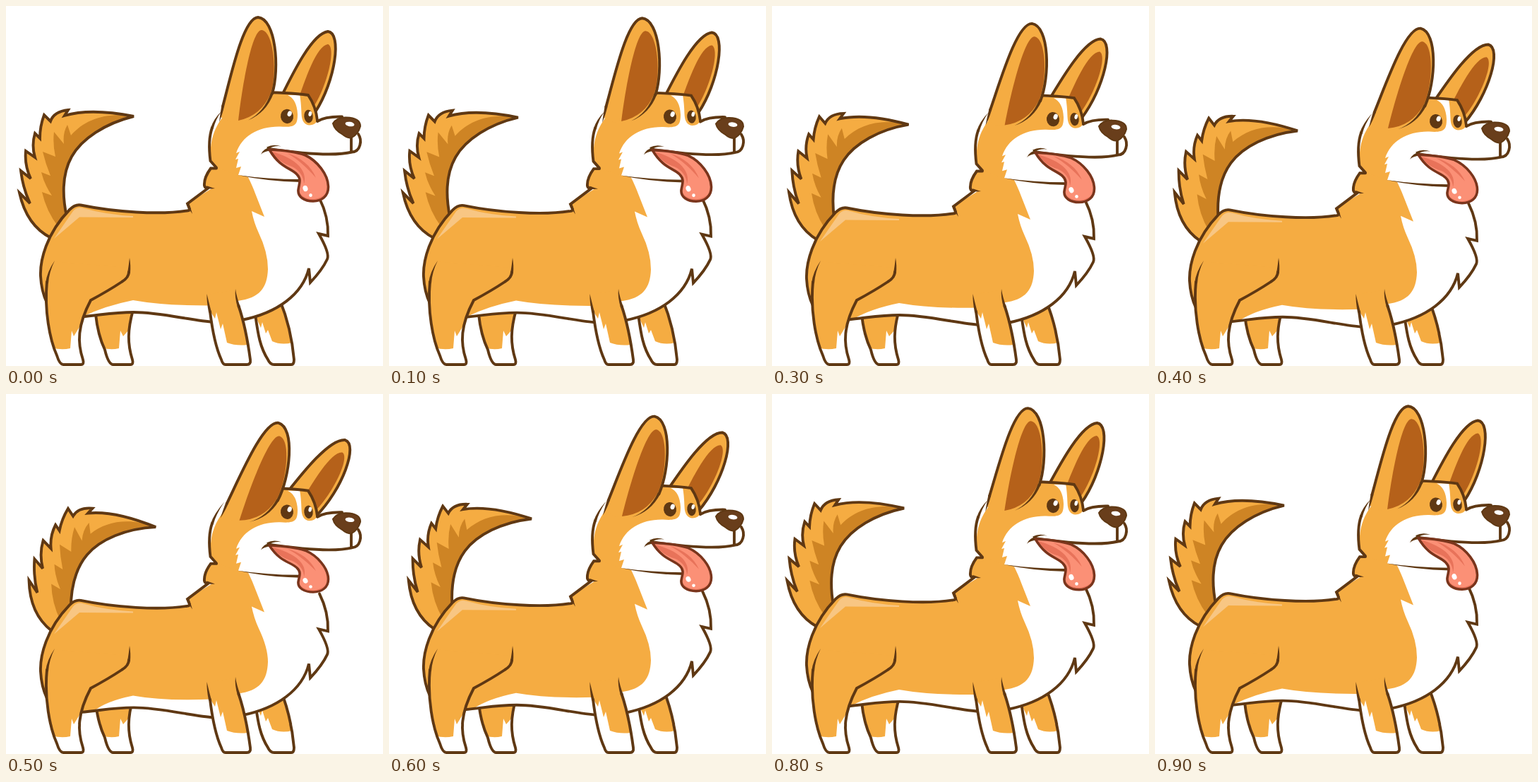
An HTML page for the animation above (1000 ms loop, 534 px wide and 509 px high).

```html
<!DOCTYPE html>
<html lang="en">
<head>
<meta charset="utf-8">
<title>Happy corgi</title>
<style>
html, body { margin: 0; width: 100%; height: 100%; overflow: hidden; background: #fff; }
svg { display: block; width: 100%; height: 100%; }
.line { fill: none; stroke: #5f3813; stroke-width: 3.9; stroke-linejoin: miter; stroke-linecap: round; }
.thin { stroke-width: 2; }
.coat { fill: #f5ac42; }
.white { fill: #fff; }
.dark { fill: #ce8424; }
.inner { fill: #b5611a; }
.shine { fill: #f8c683; }
.ink { fill: #5f3813; }
.nose { fill: #693e1b; }
.tongue { fill: #fb9076; }
.shade { fill: #e8735a; }
.lip { fill: none; stroke: #7a351c; stroke-width: 3.6; stroke-linejoin: round; }
</style>
</head>
<body>
<svg id="stage" viewBox="0 0 534 509" xmlns="http://www.w3.org/2000/svg"></svg>
<script>
const NS = 'http://www.w3.org/2000/svg';
const stage = document.getElementById('stage');

function add(parent, tag, attrs = {}) {
  const el = document.createElementNS(NS, tag);
  for (const key in attrs) el.setAttribute(key, attrs[key]);
  return parent.appendChild(el);
}
const group = () => add(stage, 'g');
const shape = (g, cls, d) => add(g, 'path', { class: cls, d });
const oval = (g, cls, cx, cy, rx, ry, turn = 0) =>
  add(g, 'ellipse', { class: cls, cx, cy, rx, ry, transform: `rotate(${turn} ${cx} ${cy})` });

// Brush stroke from a sharp tip to a full-width end
function taperPath(x0, y0, cx, cy, x1, y1, w = 3.9) {
  const len = Math.hypot(x1 - cx, y1 - cy);
  const nx = -(y1 - cy) / len * w / 2, ny = (x1 - cx) / len * w / 2;
  return `M${x0} ${y0}Q${cx + nx} ${cy + ny} ${x1 + nx} ${y1 + ny}` +
    `L${x1 - nx} ${y1 - ny}Q${cx - nx / 2} ${cy - ny / 2} ${x0} ${y0}Z`;
}
const taper = (g, ...pts) => shape(g, 'ink', taperPath(...pts));

// Leg: fill, white sock, outline
function leg(g, fill, sock, line) {
  shape(g, 'coat', fill);
  shape(g, 'white', sock);
  shape(g, 'line', line);
}

// Tail
const tail = group();
const under = 'C140 166 107 188 93 213C79 238 80 270 86 298';
const fur = 'M64 328C42 317 26 296 19 264L34 279Q24 258 21 233L35 244Q26 225 28 205' +
  'L41 214Q36 197 41 180L48 187Q48 170 54 154L63 163Q68 149 88 147L83 155Q120 144 181 156';
shape(tail, 'coat', fur + under + 'L90 330Z');
shape(tail, 'dark', 'M181 156C142 150 112 160 92 183L87 168Q80 180 82 195L68 178Q66 195 70 213' +
  'L52 206Q56 223 63 240L50 235Q54 252 65 268L51 263Q57 290 74 312L90 318L86 298' +
  'C80 270 79 238 93 213C107 188 140 166 181 156Z');
shape(tail, 'line', fur + under);

// Far ear
const farEar = group();
const farLeft = 'M386 136C402 104 432 39 456 36';
const farRight = 'C476 38 467 105 438 150';
shape(farEar, 'coat', farLeft + farRight + 'Z');
shape(farEar, 'inner', 'M410 144C424 102 440 56 456 54C468 59 455 112 436 142Z');
shape(farEar, 'line', farLeft + farRight);

// Far legs
const farLegs = group();
leg(farLegs,
  'M127 436Q131 470 142 490Q146 507 152 507H176Q181 507 179 500C172 478 172 458 180 430Z',
  'M136 483Q148 487 160 484L162 459L166 467L174 458Q172 480 180 502L177 507H150Q143 500 136 483Z',
  'M127 436Q130 465 140 486Q145 507 152 507H176Q181 507 179 500C172 478 172 458 180 430');
leg(farLegs,
  'M353 436C357 465 360 483 371 500Q374 507 380 507H404Q408 507 408 500Q404 455 388 416Z',
  'M354 440L361 455L363 447L368 463L371 458L377 474Q390 480 405 476L408 500L405 507H378Q361 486 354 440Z',
  'M353 436C357 465 360 483 371 500Q374 507 380 507H404Q408 507 408 500Q404 455 388 416');

// Trunk
const trunk = group();
const back = 'M259 289C218 296 152 291 106 281.5Q98 280 90 288C57 322 48 360 49 382Q50 403 58 420';
const belly = 'M106 439.5C135 437 150 433 181 433C220 433 262 445 295 447';
const chest = 'M334 444C384 434 420 408 429 371L431 391Q448 373 455 358Q459 350 443 322L456 325Q457 298 444 272';
shape(trunk, 'coat', back + 'L106 439.5' + belly.slice(10) + 'L334 444' + chest.slice(8) +
  'L330 238L300 228L290 229Q280 243 282 254Q283 258 293 257L257 279Z');
const bib = shape(trunk, 'white', '');
const bellyPatch = shape(trunk, 'white', '');
shape(trunk, 'shine', 'M68 329L95 290Q101 283 110 286Q142 295 180 297V299L104 298.5Z');
shape(trunk, 'line', back);
shape(trunk, 'line', belly);
shape(trunk, 'line', chest);
shape(trunk, 'line', 'M298 229.5L290 229.5Q280 243 281 254Q282 258 287 257L257 279.5L260 287');
taper(trunk, 296, 258, 290, 258, 284, 256);
taper(trunk, 264, 294, 260, 287, 257.5, 280);

// Near legs
const nearLegs = group();
const thigh = 'M58 390C54 430 62 472 72 494Q76 507 81 507H106Q111 507 109 500C101 476 101 452 120 416';
leg(nearLegs,
  'M68 361L58 390' + thigh.slice(7) + 'L165 388L174 370Z',
  'M65 483Q78 487 91 484L93 459L96 467L104 454Q102 482 110 502L107 507H79Q71 497 65 483Z',
  thigh + 'Q146 402 164 390Q174 384 174 376');
taper(nearLegs, 69, 360, 60, 376, 58, 392);
taper(nearLegs, 175, 356, 176, 366, 174, 378);
const shin = 'M289 432C293 465 299 487 305 500Q307 507 311 507H341Q347 507 346 500Q340 455 329.5 424';
leg(nearLegs,
  'M285 408L289 432' + shin.slice(8) + 'L325 401Z',
  'M289 431L296 442L298 433L304 457L307 449L313 476Q326 481 342 479L346 500L343 507H309Q294 474 289 431Z',
  shin);
taper(nearLegs, 284.5, 407, 286, 418, 289, 433);
taper(nearLegs, 325, 400, 325.5, 411, 330, 426);

// Head
const head = group();
const brow = 'M350 122Q400 122 428 126Q439 142 441 162';
const muzzle = 'M441 163Q452 156 476 156.5M499 181C505 190 502 206 490 206.5C472 211 435 211 372 202M489 184V205';
shape(head, 'coat', 'M320 140L350 122L428 126Q439 142 441 162L413 247L330 240L299 229L290 219' +
  'C288 192 294 172 311 152Z');
shape(head, 'white', 'M399 126Q412 132 413 153C413 169 409 172 388 170.5C357 170 334 184 326 208L331 206' +
  'L325 217L329 216L326 229L333 227L329 239Q370 246 415 247L420 212Q470 212 490 207' +
  'Q504 204 502 188L490 160Q460 152 441 163Q439 142 428 126Z');
shape(head, 'coat', 'M418 125L428 126Q439 142 441 162Q438 168 430 168.5Q419 168 418.5 152Q418 136 416 125Z');
shape(head, 'line', 'M298 228.5L289.5 219C287 200 287 186 292 172');
const nape = shape(head, 'ink', '');
shape(head, 'line', brow);
shape(head, 'line', muzzle);
taper(head, 328, 239, 370, 246, 417, 247);
taper(head, 361, 210, 364, 203, 375, 202, 5);
taper(head, 390, 198.5, 380, 196, 370, 201, 3.6);
oval(head, 'ink', 398, 156, 9, 10.2, -8);
oval(head, 'white', 401.7, 152.3, 3, 4, 20);
oval(head, 'ink', 428.5, 156, 6.2, 9.2, -6);
oval(head, 'white', 430.8, 152.4, 2.3, 3.6, 12);
const snub = 'M463 166Q469 157 482 157.5Q502 158 502 170Q499 181 490 186Q484 188 476 181Q465 175 463 166Z';
shape(head, 'nose', snub);
shape(head, 'line thin', snub);
oval(head, 'white', 487, 167, 6.5, 3.2, 8);

// Tongue
const tongue = group();
const lick = 'M373 203C395 204 410 206 424 211C441 219 456 238 456.5 255C457 269 447 276 435 276' +
  'C423 276 413 270 414 260C415 252 419 245 412 238C404 229 388 229 373 203Z';
shape(tongue, 'tongue', lick);
shape(tongue, 'shade', 'M376 206C390 209 407 217 415 226C424 236 424 245 422 252C422 240 414 231 405 227C392 223 384 216 376 206Z');
shape(tongue, 'shade', 'M398 208C418 214 432 226 439 243C427 229 414 217 398 208Z');
shape(tongue, 'shade', 'M415 262C420 274 440 278 453 265C446 280 419 279 415 262Z');
shape(tongue, 'lip', lick);
oval(tongue, 'white', 424, 258, 3.4, 4.3, -20);
oval(tongue, 'white', 431.5, 267.5, 2.3, 2.5);

// Near ear
const nearEar = group();
const earLine = 'M307 142C319 97 336 17 357 16C382 18 388 88 377 124';
shape(nearEar, 'coat', earLine + 'Q367 149 340 162L318 164L304 157Z');
shape(nearEar, 'inner', 'M329 162C333 125 347 34 362 34C380 36 384 98 375 123Q362 155 329 162Z');
shape(nearEar, 'line', earLine);
taper(nearEar, 302, 164, 304, 155, 307.3, 141);
taper(nearEar, 343, 161.5, 367, 150, 377, 123);

const move = (g, value) => g.setAttribute('transform', value);
const swing = (g, p, angle, x, y, dx, dy) =>
  move(g, `translate(${dx * p} ${dy * p}) rotate(${angle * p} ${x} ${y})`);

// p runs from 0 (standing tall) to 1 (crouched)
function pose(p) {
  const sink = 10.4 * p, hold = 0.35 * sink;
  swing(tail, p, 11, 68, 325, 1, 7.5);
  swing(farEar, p, 12, 439, 150, 1, 23);
  swing(nearEar, p, 11, 330, 162, 1.5, 17);
  move(trunk, `translate(0 ${sink})`);
  move(head, `translate(0 ${10.8 * p})`);
  move(tongue, `translate(0 ${30.6 * p}) scale(1 ${1 - 0.096 * p})`);
  nape.setAttribute('d', taperPath(305 + 4 * p, 149 - 7 * p, 296, 160, 291.8, 173));
  // The lower edges of the white patches stay closer to the legs
  bib.setAttribute('d', `M342 240Q349 254 353 265L366 298L348 290Q351 306 358 321` +
    `Q371 348 371 ${372 - hold}C370 ${398 - hold} 360 ${413 - hold} 328 ${417 - hold}` +
    `L330 444L334 444${chest.slice(8)}L413 244Z`);
  bellyPatch.setAttribute('d', `M${109 + 14 * p} 439Q140 424 180 416Q225 424 292 ${423.5 - 2.4 * p}` +
    `L330 ${424 - 3 * p}V444L295 447C262 445 220 433 181 433C150 433 135 437 ${109 + 14 * p} 439Z`);
}

function frame() {
  const step = Math.floor(performance.now() / 100) % 10;
  const k = Math.min(step, 10 - step) / 5;
  pose(k * (0.1 + 0.9 * k));
  requestAnimationFrame(frame);
}
frame();
</script>
</body>
</html>
```
